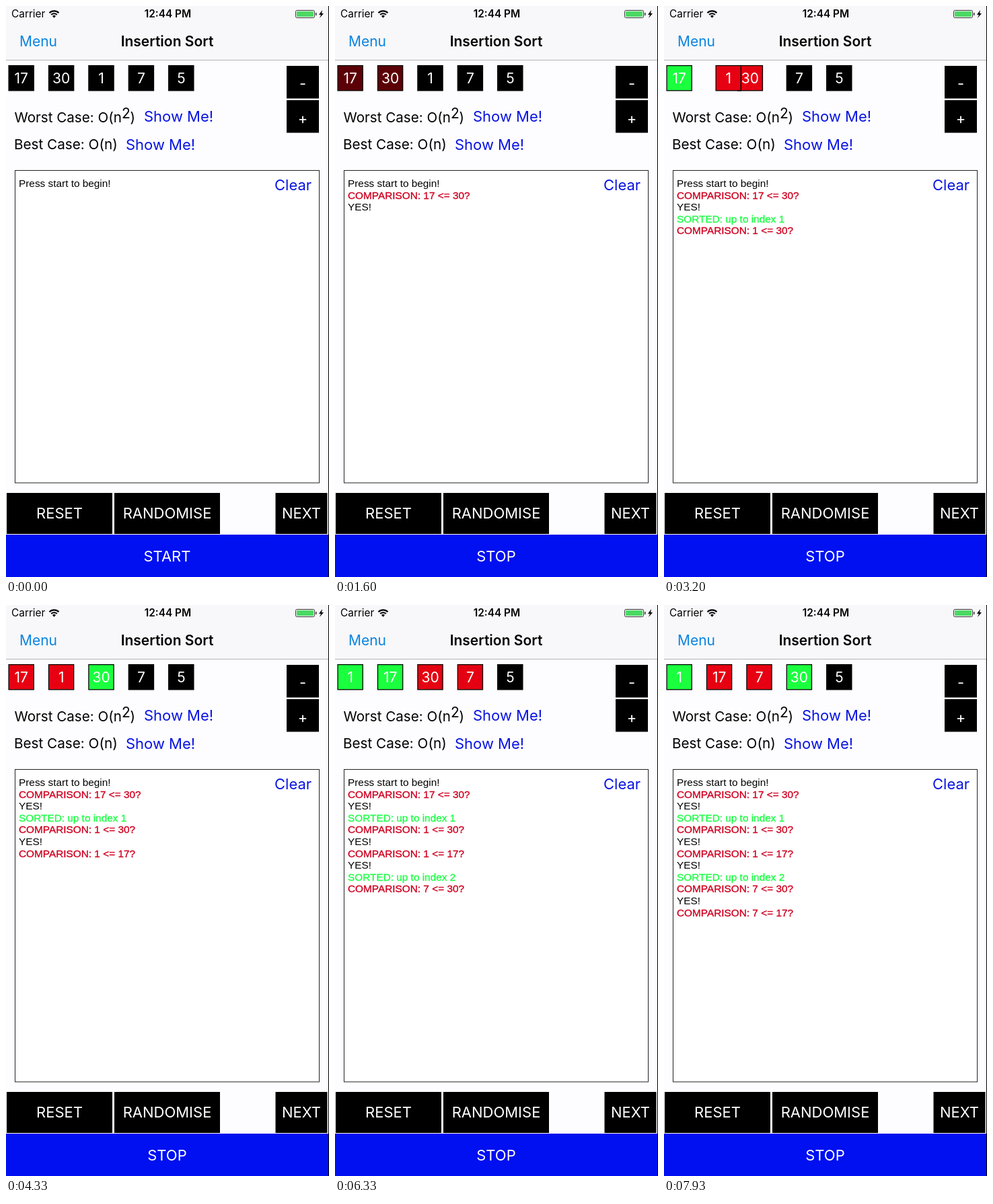
These frames come from a looping animation (480x849 px, 8000 ms). An HTML page:

```html
<!DOCTYPE html>
<html lang="en">
<head>
<meta charset="utf-8">
<title>Insertion Sort</title>
<style>
  html, body { margin: 0; width: 100%; height: 100%; overflow: hidden; background: #fdfcfe; }
  svg { display: block; width: 100%; height: 100%; }
  text { white-space: pre; font-family: Inter, sans-serif; }
  .log text { font: 15.36px "Liberation Sans", Arial, sans-serif; }
</style>
</head>
<body>
<svg id="stage" viewBox="0 0 480 849"></svg>
<script>
const LOOP = 8000, TICK = 515, FIRST = 800;
const BLACK = [0, 0, 0], RED = [230, 0, 18], GREEN = [26, 255, 62];
const BLUE = '#0010f0', LINK = '#0814e0';
const stage = document.getElementById('stage');

function add(tag, attrs, parent = stage) {
  const el = document.createElementNS('http://www.w3.org/2000/svg', tag);
  for (const key in attrs) el.setAttribute(key, attrs[key]);
  parent.append(el);
  return el;
}
const rect = (x, y, width, height, fill, more, parent) =>
  add('rect', { x, y, width, height, fill, ...more }, parent);
const path = (d, more) => add('path', { d, fill: 'none', stroke: '#000', ...more });
function label(str, x, y, size, fill = '#000', more, parent) {
  const el = add('text', { x, y, 'font-size': size, fill, ...more }, parent);
  el.textContent = str;
  return el;
}
const centred = (str, x, y, size, fill, more, parent) =>
  label(str, x, y, size, fill, { 'text-anchor': 'middle', ...more }, parent);
function button(str, x, y, w, h, baseline, fill = '#000') {
  rect(x, y, w, h, fill);
  return centred(str, x + w / 2, baseline, 22, '#fff');
}

// Status and navigation bars
rect(0, 0, 480, 80, '#f8f7f9');
rect(0, 80, 480, 1, '#b4b4b6');
label('Carrier', 8, 17, 15.4);
path('M64.5 10.2a10 10 0 0 1 14 0M67.2 13a6.2 6.2 0 0 1 8.6 0', { 'stroke-width': 2.1 });
path('M69 15a3.6 3.6 0 0 1 5 0l-2.5 2.8z', { fill: '#000', stroke: 'none' });
centred('12:44 PM', 240.5, 17, 15.4, '#000', { 'font-weight': 600 });
rect(430.5, 6.5, 28, 11, 'none', { rx: 2, stroke: '#333' });
rect(432, 8, 25, 8, '#4cd964', { rx: 1 });
rect(460, 10, 1.5, 4, '#333');
path('M470 6l-5 7h3l-2 5 6-7h-3z', { fill: '#000', stroke: 'none' });
label('Menu', 20, 60, 21, '#0a84e0');
centred('Insertion Sort', 239.5, 60, 21, '#000', { 'font-weight': 600 });

// Complexity notes and size controls
label('Worst Case: O(n', 12.5, 173.3, 20.6);
label('2', 172, 167, 21);
label(')', 184.5, 173.3, 20.6);
label('Show Me!', 205, 172, 22, LINK);
label('Best Case: O(n)', 12, 212.7, 20.7);
label('Show Me!', 178, 214, 22, LINK);
button('-', 417, 89, 48, 48.5, 123);
button('+', 417, 140, 48, 48.5, 174.5);

// Log panel and bottom buttons
rect(13.5, 244.5, 452, 464.5, '#fff', { stroke: '#222' });
label('Clear', 399, 274, 22, LINK);
button('RESET', 1, 724, 157, 61, 762);
button('RANDOMISE', 161, 724, 157, 61, 762);
button('NEXT', 400.5, 724, 77, 61, 762);
const toggle = button('START', 0, 786, 479, 63, 826, BLUE);

// Dark right edge
rect(479, 0, 1, 849, '#000');

const log = add('g', { class: 'log' });
const TONES = { C: '#d00020', S: '#1eff46' };
const lines = [
  [-2, 'Press start to begin!'],
  [0, 'COMPARISON: 17 <= 30?'], [1, 'YES!'], [2, 'SORTED: up to index 1'],
  [3, 'COMPARISON: 1 <= 30?'], [5, 'YES!'],
  [6, 'COMPARISON: 1 <= 17?'], [8, 'YES!'], [9, 'SORTED: up to index 2'],
  [10, 'COMPARISON: 7 <= 30?'], [12, 'YES!'], [13, 'COMPARISON: 7 <= 17?']
].map(([tick, str], i) => {
  const tone = TONES[str[0]];
  const weight = tone ? { stroke: tone, 'stroke-width': 0.35 } : {};
  return { tick, el: label(str, 19, 269 + 17.6 * i, 15.36, tone, weight, log) };
});

// Each box: value, starting slot, moves [tick, slot], colours [tick, colour]
const boxes = [
  [17, 0, [[7, 1]], [[0, RED], [1, BLACK], [2, GREEN], [6, RED], [8, GREEN], [13, RED]]],
  [30, 1, [[4, 2], [11, 3]], [[0, RED], [1, BLACK], [2, GREEN], [3, RED], [5, GREEN], [10, RED], [12, GREEN]]],
  [1, 2, [[4, 1], [7, 0]], [[3, RED], [5, BLACK], [6, RED], [8, BLACK], [9, GREEN]]],
  [7, 3, [[11, 2]], [[10, RED], [12, BLACK], [13, RED]]],
  [5, 4, [], []]
].map(([value, slot, moves, colours]) => {
  const el = add('g', {});
  const face = rect(4.1, 88.6, 37.2, 37.2, '#000', { stroke: '#000', 'stroke-width': 1.28 }, el);
  centred(value, 22.8, 115, 21, '#fff', {}, el);
  return { el, face, slot, moves, colours };
});

const ease = s => s ** 1.8 / (s ** 1.8 + (1 - s) ** 1.8);
function track(start, steps, now, mix) {
  let value = start;
  for (const [tick, goal] of steps) {
    if (now < tick) break;
    const span = goal === RED ? 0.8 : 1;
    value = mix(value, goal, ease(Math.min(1, (now - tick) / span)));
  }
  return value;
}
const lerp = (a, b, k) => a + (b - a) * k;
const blend = (a, b, k) => a.map((v, i) => lerp(v, b[i], k));

function draw(ms) {
  const now = (ms - FIRST) / TICK;
  toggle.textContent = now < -1 ? 'START' : 'STOP';
  for (const { tick, el } of lines) {
    el.style.display = now < tick ? 'none' : '';
    // a new line is briefly cut off while the log grows
    el.style.clipPath = now - tick < 0.15 ? 'inset(0 0 45% 0)' : 'none';
  }
  for (const { el, face, slot, moves, colours } of boxes) {
    el.setAttribute('transform', `translate(${59.4 * track(slot, moves, now, lerp)} 0)`);
    face.setAttribute('fill', `rgb(${track(BLACK, colours, now, blend).map(Math.round)})`);
  }
}

const begun = performance.now();
(function frame() {
  draw((performance.now() - begun) % LOOP);
  requestAnimationFrame(frame);
})();
</script>
</body>
</html>
```
